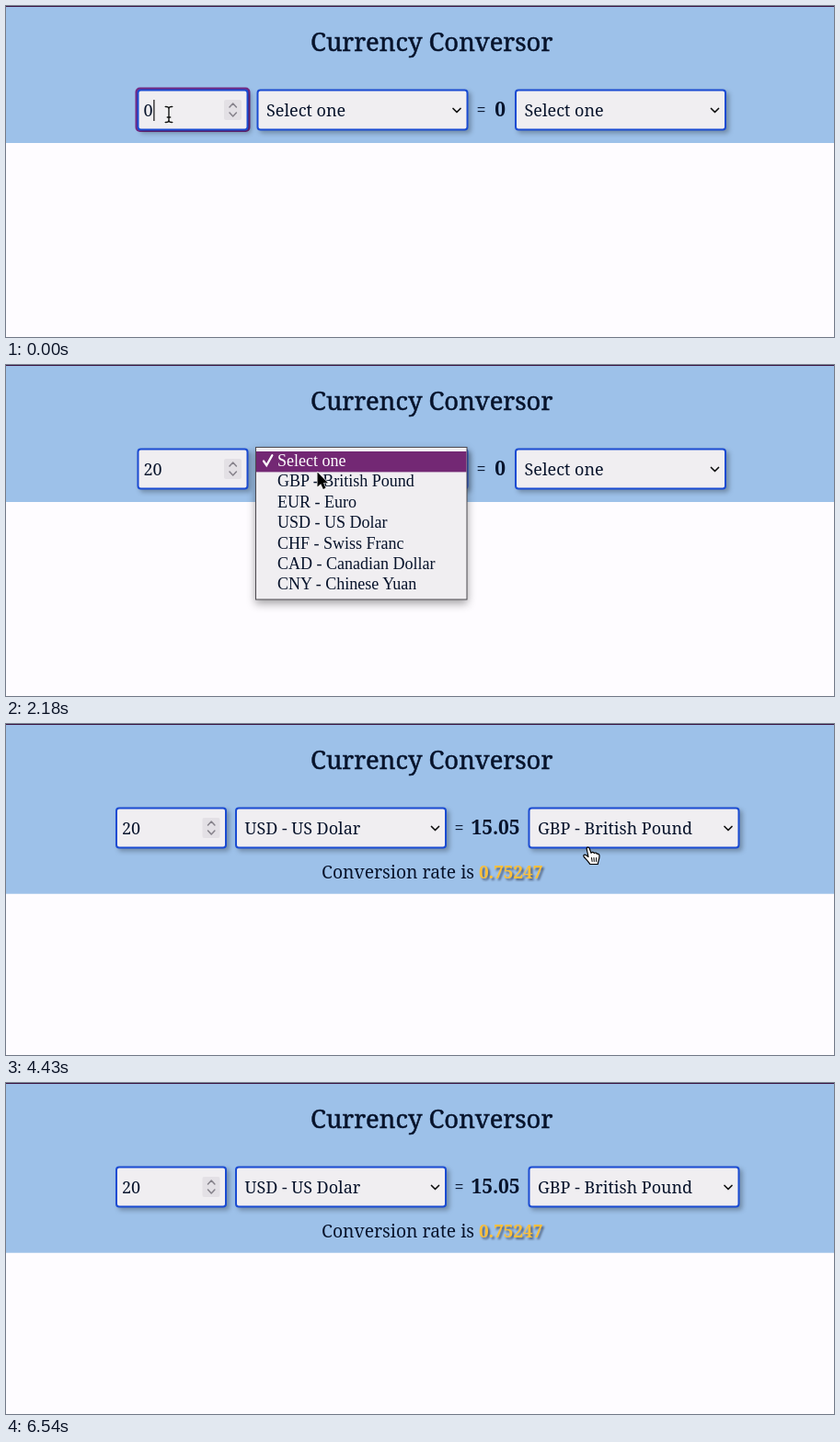
An HTML page for the animation above (6.58 s loop, 900 by 360 pixels).

```html
<!DOCTYPE html>
<html lang="en">
<head>
<meta charset="utf-8">
<title>Currency Conversor</title>
<style>
  html, body { margin: 0; width: 100%; height: 100%; overflow: hidden; background: #fefcff; }
  svg { display: block; width: 900px; height: 360px; }
  text { font-family: "Lora", "Noto Serif", serif; font-size: 18px; fill: #07132b; white-space: pre; }
  .title { font-size: 27.4px; stroke: #07132b; stroke-width: .5px; }
  .amount { font-size: 21px; font-weight: 600; }
  .rate { font-size: 19.3px; }
  .value { font-size: 19px; font-weight: 700; fill: #fbc03c; filter: drop-shadow(2px 2px 1px rgba(20, 25, 50, .6)); }
  .field { fill: #f0eef1; stroke: #1a4bd2; stroke-width: 2px; filter: drop-shadow(3px 3px 2.5px rgba(0, 0, 0, .28)); }
  .chevron { fill: none; stroke: #111; stroke-width: 1.7px; stroke-linecap: round; stroke-linejoin: round; }
  .spin { stroke: #85818a; stroke-width: 1.5px; }
  .menu text { font-family: "Liberation Serif", Times, serif; }
  .panel { fill: #f0eef1; stroke: #4d4a50; stroke-width: 1px; filter: drop-shadow(0 4px 5px rgba(0, 0, 0, .36)); }
</style>
</head>
<body>
<svg id="stage" viewBox="0 0 900 360"></svg>
<script>
const LOOP = 6580;
const OPTIONS = ["Select one", "GBP - British Pound", "EUR - Euro", "USD - US Dolar",
  "CHF - Swiss Franc", "CAD - Canadian Dollar", "CNY - Chinese Yuan"];
const ROW = 22.4;
const AT = { erase: 480, two: 760, zero: 920, moveOut: 1340, open1: 2000, close1: 2800,
  open2: 3680, close2: 4270, result: 4400 };

// Pointer stops: time, x, y
const PATH = [
  [0, 177, 118], [1340, 177, 118], [1640, 276, 116], [1960, 338, 116], [2200, 338, 116],
  [2620, 346, 171], [3060, 346, 171], [3540, 633, 117], [3700, 633, 117], [3790, 633, 126],
  [4150, 634, 134], [5130, 634, 134], [5430, 725, 118], [5800, 852, -6], [5900, 856, -30],
  [LOOP, 856, -30]
];

const stage = document.getElementById("stage");

function add(parent, tag, attrs = {}, content) {
  const node = document.createElementNS("http://www.w3.org/2000/svg", tag);
  for (const key in attrs) node.setAttribute(key, attrs[key]);
  if (content !== undefined) node.textContent = content;
  parent.appendChild(node);
  return node;
}
const group = (cls = "") => add(stage, "g", { class: cls });
const show = (node, on) => node.setAttribute("visibility", on ? "visible" : "hidden");
const place = (node, x, y = 0) => node.setAttribute("transform", `translate(${x} ${y})`);
const setText = (node, value) => { if (node.textContent !== value) node.textContent = value; };

add(stage, "rect", { width: 900, height: 360, fill: "#fefcff" });
const header = add(stage, "rect", { width: 900, height: 149, fill: "#9dc1e9" });
add(stage, "rect", { width: 900, height: 1, fill: "#3b1644" });
add(stage, "text", { class: "title", x: 462.7, y: 48.5, "text-anchor": "middle" }, "Currency Conversor");

const input = group();
const ring = add(input, "rect", { x: 140.5, y: 88.5, width: 125, height: 48.5, rx: 5, fill: "#742a86" });
add(input, "rect", { class: "field", x: 143.5, y: 91.5, width: 119, height: 43, rx: 3 });
add(input, "rect", { x: 237, y: 102, width: 19, height: 22, rx: 2, fill: "#e3e0e5" });
add(input, "path", { class: "chevron spin", d: "M243 110l3.7-4 3.7 4M243 116l3.7 4 3.7-4" });
const typed = add(input, "text", { x: 149.5, y: 119.5 });
const caret = add(input, "rect", { y: 102, width: 1.2, height: 23, fill: "#111" });

function select() {
  const g = group();
  add(g, "rect", { class: "field", x: 273.5, y: 91.5, width: 228, height: 43, rx: 3 });
  add(g, "path", { class: "chevron", d: "M486 111.5l4 4 4-4" });
  return { g, label: add(g, "text", { x: 283, y: 119.5 }) };
}
const from = select();
const to = select();

const equals = add(stage, "text", { y: 119, "text-anchor": "middle" }, "=");
const amount = add(stage, "text", { class: "amount", y: 120, "text-anchor": "middle" });

const rate = group();
add(rate, "text", { class: "rate", x: 509, y: 167.5, "text-anchor": "end" }, "Conversion rate is");
add(rate, "text", { class: "value", x: 514, y: 167.5 }, "0.75247");

function menu(offset) {
  const g = group("menu");
  place(g, offset);
  add(g, "rect", { class: "panel", x: 271.5, y: 89.5, width: 229.5, height: 165.5 });
  const bar = add(g, "rect", { x: 272, width: 228.5, height: ROW, fill: "#732874" });
  const check = add(g, "path", { d: "M280 104.5l3.2 4.6 6.2-11", fill: "none", "stroke-width": 2.2, "stroke-linecap": "round" });
  const labels = OPTIONS.map((name, i) => add(g, "text", { x: 295, y: 110 + i * ROW }, name));
  return { g, bar, check, labels };
}
const fromMenu = menu(0);
const toMenu = menu(280.5);

function drawMenu(m, open, active) {
  show(m.g, open);
  m.bar.setAttribute("y", 94 + active * ROW);
  m.check.setAttribute("stroke", active ? "#07132b" : "#fff");
  m.labels.forEach((label, i) => { label.style.fill = i === active ? "#fff" : "#07132b"; });
}

const outline = { "stroke-linejoin": "round", "stroke-linecap": "round" };
const cursors = { arrow: group(), hand: group(), beam: group() };
add(cursors.arrow, "path", { ...outline, d: "M.5 .5V16.6L4.2 13.2 6.8 19 9.5 17.8 7 12.2H12Z",
  fill: "#000", stroke: "#fff", "stroke-width": 1.2, "paint-order": "stroke" });
add(cursors.hand, "path", { ...outline, fill: "#fff", stroke: "#000", "stroke-width": 1.2,
  d: "M-2.8 2C-3.2 -.2 -.5 -.6 .2 1.4L2 6.3C3 5 5 5.2 5.3 6.6 6.6 5.5 8 6 8.3 7.3 9.8 6.6 11 7.6 11 9.5 11 13 9.8 14.4 9.3 18.5H.8C-.6 16-2.8 13.8-5.8 10.5-7 8.8-5.4 7.4-3.6 8.6L-1 10.5Z" });
add(cursors.hand, "path", { ...outline, d: "M2.5 11.5l.6 4M5 11.5l.3 4M7.7 11.5l-.1 4", stroke: "#000", "stroke-width": 1 });
const beam = "M-3.8 -8.5Q-.2 -8.8 0 -6.5V6.5Q-.2 8.8 -3.8 8.5M3.8 -8.5Q.2 -8.8 0 -6.5M0 6.5Q.2 8.8 3.8 8.5M-1.8 3H1.8";
for (const [stroke, width] of [["#fff", 2.8], ["#111", 1.4]])
  add(cursors.beam, "path", { ...outline, d: beam, fill: "none", stroke, "stroke-width": width });

function pointerAt(t) {
  const i = Math.max(1, PATH.findIndex(stop => stop[0] > t));
  const [t0, x0, y0] = PATH[i - 1], [t1, x1, y1] = PATH[i];
  const p = (t - t0) / (t1 - t0), e = p * p * (3 - 2 * p);
  return [x0 + (x1 - x0) * e, y0 + (y1 - y0) * e];
}

function cursorKind(x, y, menuOpen, shiftLeft, shiftRight) {
  if (menuOpen || y < 91 || y > 135) return "arrow";
  const within = (a, b) => x > a && x < b;
  if (within(143 + shiftLeft, 237 + shiftLeft)) return "beam";
  if (within(278 + shiftLeft, 502 + shiftLeft) || within(553 + shiftRight, 783 + shiftRight)) return "hand";
  return "arrow";
}

function render(t) {
  const done = t >= AT.result;
  const left = done ? -23.5 : 0, right = done ? 14.5 : 0;
  const open1 = t >= AT.open1 && t < AT.close1;
  const open2 = t >= AT.open2 && t < AT.close2;
  const focused = t < AT.open1;

  header.setAttribute("height", done ? 184.7 : 149);
  place(input, left);
  place(from.g, left);
  place(to.g, 280.5 + right);
  show(ring, focused);
  show(rate, done);

  const value = t < AT.erase ? "0" : t < AT.two ? "" : t < AT.zero ? "2" : "20";
  const lastKey = [AT.zero, AT.two, AT.erase].find(key => t >= key) ?? -100;
  setText(typed, value);
  caret.setAttribute("x", 150.2 + value.length * 10.1);
  show(caret, focused && (t - lastKey) % 1000 < 500);

  setText(from.label, OPTIONS[t >= AT.close1 ? 3 : 0]);
  setText(to.label, OPTIONS[t >= AT.close2 ? 1 : 0]);
  equals.setAttribute("x", done ? 492.5 : 516.5);
  amount.setAttribute("x", done ? 532 : 537);
  setText(amount, done ? "15.05" : "0");

  const [x, y] = pointerAt(t);
  const row = Math.max(0, Math.min(6, Math.floor((y - 94) / ROW)));
  drawMenu(fromMenu, open1, row);
  drawMenu(toMenu, open2, t < 3830 ? 0 : row);

  const kind = cursorKind(x, y, open1 || open2, left, right);
  const typing = t >= AT.erase && t < AT.moveOut;
  for (const name in cursors) {
    show(cursors[name], name === kind && !typing);
    place(cursors[name], x, y);
  }
}

const start = performance.now();
function tick() {
  render((performance.now() - start) % LOOP);
  requestAnimationFrame(tick);
}
tick();
</script>
</body>
</html>
```
